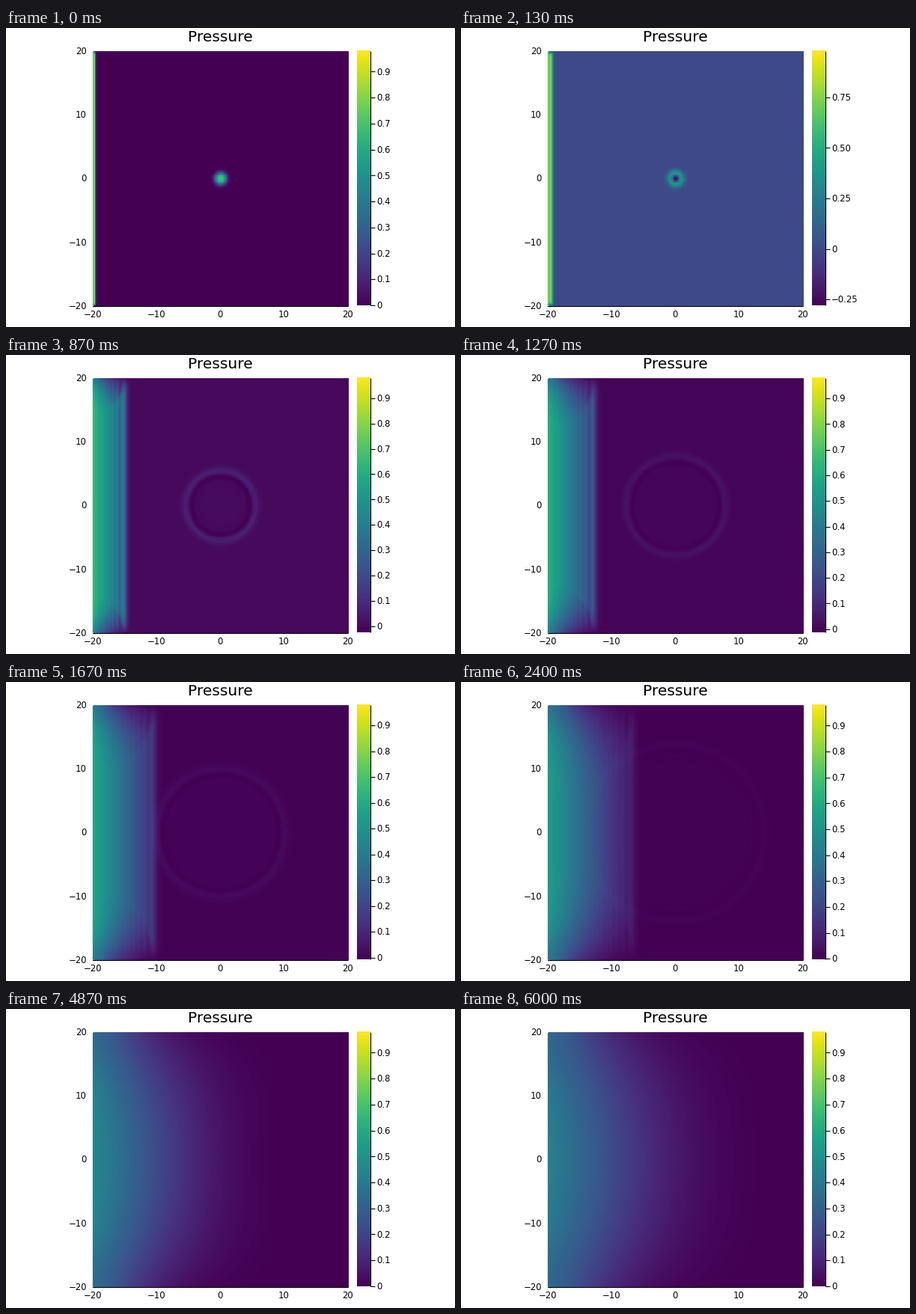
Write a matplotlib script that moves like this. It is 600x400 px and loops after 6.67 s.

```python
import numpy as np
import matplotlib.pyplot as plt
from matplotlib.animation import FuncAnimation
from matplotlib.collections import LineCollection
from matplotlib.patches import Rectangle

W, H, DPI = 600, 400, 100
FRAMES, LOOP = 100, 6670

# Damped wave in a square, with walls that relax toward their neighbours
N, HALF = 201, 20.0
DX = 2 * HALF / (N - 1)
STEP, SUB = 0.385, 8
DT = STEP / SUB
DAMP, WALL, TOP = 0.4, 0.25, 0.98


def solve():
    x = np.linspace(-HALF, HALF, N)
    r2 = x[:, None] ** 2 + x[None, :] ** 2
    p = 1.64 * np.exp(-r2 / 0.6 ** 2)
    p[:, 0] = TOP
    prev = p.copy()
    gain = (DT / DX) ** 2
    drag = DAMP * DT / 2
    relax = WALL * DT / DX
    mid = slice(1, -1)
    out = []
    for n in range(FRAMES * SUB):
        c = p[mid, mid]
        lap = p[:-2, mid] + p[2:, mid] + p[mid, :-2] + p[mid, 2:] - 4 * c
        nxt = p.copy()
        if n == 0:
            nxt[mid, mid] = c + gain * lap / 2
        else:
            nxt[mid, mid] = (2 * c - (1 - drag) * prev[mid, mid] + gain * lap) / (1 + drag)
        nxt[mid, 0] += relax * (p[mid, 1] - p[mid, 0])
        nxt[mid, -1] += relax * (p[mid, -2] - p[mid, -1])
        nxt[0, mid] += relax * (p[1, mid] - p[0, mid])
        nxt[-1, mid] += relax * (p[-2, mid] - p[-1, mid])
        prev, p = p, nxt
        if (n + 1) % SUB == 0:
            out.append(p)
    return out


fields = solve()

# Layout in pixels, y downward
L, R, T, B = 115.6, 456.8, 30.7, 371.6
BAR_L, BAR_R = 469, 487
TITLE, SMALL = 20.3, 11.6


def pt(px):
    return px * 72 / DPI


plt.rcParams["font.family"] = "DejaVu Sans"
fig = plt.figure(figsize=(W / DPI, H / DPI), dpi=DPI, facecolor="white")
ax = fig.add_axes([0, 0, 1, 1])
ax.axis("off")


def line(xs, ys):
    ax.plot(xs, ys, color="black", lw=pt(1.2), zorder=1, solid_capstyle="butt")


def label(x, y, s="", ha="center", size=SMALL):
    return ax.text(x, y, s, ha=ha, va="baseline", fontsize=pt(size), color="black", zorder=4)


label((L + R) / 2, 18.2, "Pressure", size=TITLE)
line([L, L], [T, B])
line([L, R], [B, B])
for v in range(-20, 21, 10):
    f = (v + HALF) / (2 * HALF)
    x, y = L + f * (R - L), B - f * (B - T)
    text = str(v).replace("-", "\u2212")
    label(x, 387.4, text)
    label(108, y + 4.2, text, ha="right")
    line([x, x], [B, B - 4])
    line([L, L + 4], [y, y])

pad = (R - L) / (N - 1) / 2
field = ax.imshow(fields[0], cmap="viridis", origin="lower", interpolation="nearest",
                  extent=(L - pad, R + pad, B + pad, T - pad), aspect="auto", zorder=2)
field.set_clip_path(Rectangle((L, T), R - L, B - T, transform=ax.transData))

ax.imshow(np.linspace(1, 0, 256)[:, None], cmap="viridis", interpolation="nearest",
          extent=(BAR_L, BAR_R, B - 0.6, T), aspect="auto", zorder=2)
line([BAR_R, BAR_R], [T, B - 0.6])
marks = LineCollection([], colors="black", linewidths=pt(1.1), zorder=3)
ax.add_collection(marks, autolim=False)
texts = [label(495.2, 0, ha="left") for _ in range(12)]
ax.set_xlim(0, W)
ax.set_ylim(H, 0)


def bar_ticks(low):
    """Values and labels for the colour bar, coarser for a wide range."""
    step, digits = (0.25, 2) if low < -0.025 else (0.1, 1)
    first = int(np.ceil(low / step - 1e-6))
    last = int(np.floor(TOP / step))
    for i in range(first, last + 1):
        text = f"{i * step:.{digits}f}" if i else "0"
        yield i * step, text.replace("-", "\u2212")


def draw(k):
    p = fields[k]
    low = min(p.min(), 0)
    field.set_data(p)
    field.set_clim(low, TOP)
    ticks = list(bar_ticks(low))
    segs = []
    for i, t in enumerate(texts):
        t.set_visible(i < len(ticks))
        if i < len(ticks):
            v, s = ticks[i]
            y = B - 0.6 - (v - low) / (TOP - low) * (B - 0.6 - T)
            segs.append([(BAR_R, y), (BAR_R + 6, y)])
            t.set_text(s)
            t.set_y(y + 4.2)
    marks.set_segments(segs)
    return [field, marks, *texts]


anim = FuncAnimation(fig, draw, frames=FRAMES, interval=LOOP / FRAMES, repeat=True,
                     repeat_delay=0, blit=False)
plt.show()
```
